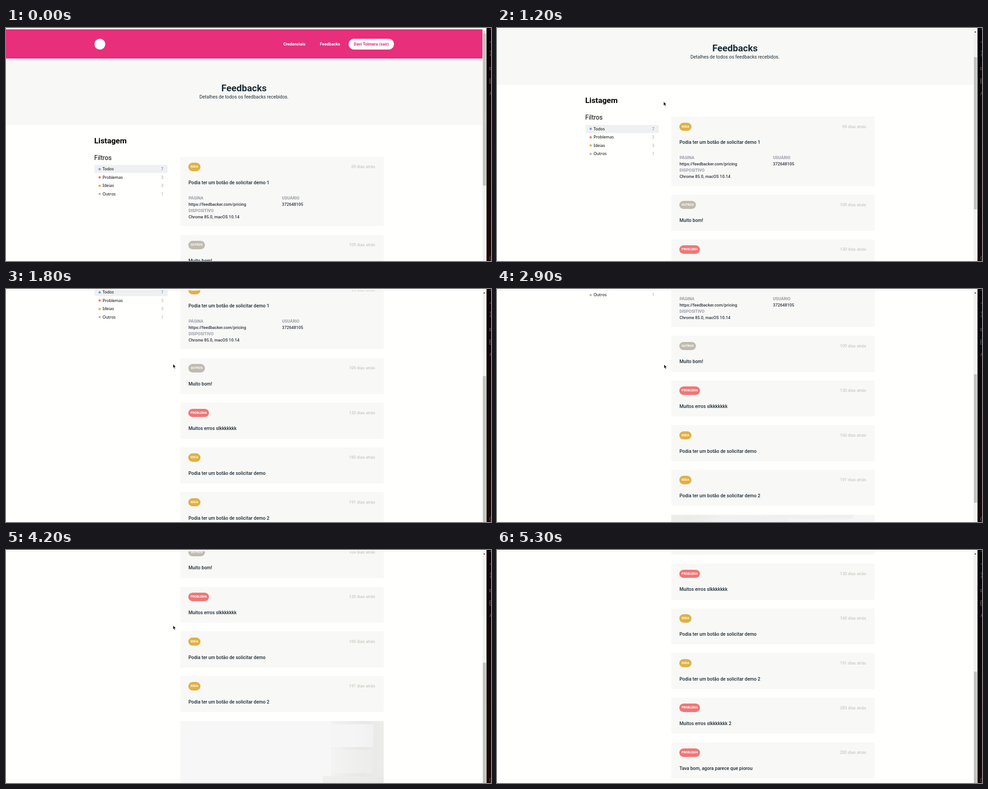
These frames come from a looping animation (1080 by 519 pixels, 6200 ms). An HTML page:

```html
<!DOCTYPE html>
<html lang="pt-BR">
<head>
<meta charset="utf-8">
<title>Feedbacks</title>
<style>
html, body { margin: 0; width: 100%; height: 100%; overflow: hidden; background: #fffffd; }
body { position: relative; font: 9.25px/14px Roboto, sans-serif; color: #1b2c37; }
div, svg { position: absolute; }
div { white-space: nowrap; }
#view { left: 0; top: 3px; width: 1061px; height: 516px; overflow: hidden; }
#page { left: 0; width: 1061px; height: 1130px; }
.header { background: #e72f7c; }
.hero { background: #f8f8f6; }
.logo { background: #fff; border-radius: 50%; }
.nav { font-weight: 700; color: #fff; }
.user { background: #fff; border-radius: 12px; color: #e72f7c; font-weight: 700; line-height: 23.5px; text-align: center; }
.h1 { font-size: 20.8px; font-weight: 700; width: 1060px; text-align: center; }
.sub { font-size: 10.4px; width: 1060px; text-align: center; }
.h2 { font-size: 17.3px; font-weight: 700; color: #000; }
.h3 { font-size: 13.9px; color: #000; }
.active { background: #eff0f1; border-radius: 2px; }
.dot { border-radius: 50%; }
.filter { font: 9px/14px "Noto Sans", sans-serif; color: #000; }
.count { width: 30px; text-align: right; font-weight: 500; }
.card { background: #f8f8f6; border-radius: 2px; }
.badge { height: 18.5px; border-radius: 10px; padding: 0 4.6px; color: #fff; font-size: 6.9px; font-weight: 700; line-height: 18.5px; }
.date { width: 100px; text-align: right; color: #c1bdb4; }
.title { font-size: 10.4px; font-weight: 500; }
.label { font-weight: 700; color: #9a9ba9; }
.value { font-weight: 500; color: #2c3340; }
.early { background:
  linear-gradient(90deg, #f2f3f2, #f5f6f5) 262px 8px / 191px 147px no-repeat,
  linear-gradient(90deg, #ecedeb 22px, #ebecea 40px, #f0f1f0 110px, #eeefee 404px, #f5f6f5 404px); }
.late { background:
  linear-gradient(90deg, #f4f5f4 55%, #f0f1f0) 336px 7px / 94px 51px no-repeat,
  linear-gradient(90deg, #f3f4f3, #ececea) 336px 64px / 94px 52px no-repeat,
  linear-gradient(90deg, #eff0ee, #e9e9e7) 317px 123px / 136px 32px no-repeat,
  linear-gradient(90deg, #f1f2f1, #e7e8e6 60%, #ecedeb) 336px 0 / 117px 155px no-repeat,
  #f6f7f6; }
#edge { left: 0; top: 3px; width: 1061px; height: 1px; background: rgba(0, 0, 0, .07); }
#track { left: 1061px; top: 3px; width: 9px; height: 516px; background: #f1f1ef; overflow: hidden; }
#thumb { left: 1px; width: 7px; background: #c1c3bf; }
#arrow { left: 2px; top: 4px; border: solid transparent; border-width: 0 2.5px 3px; border-bottom-color: #333; }
#dock { left: 1070px; top: 0; }
</style>
</head>
<body>
<div id="view"><div id="page"></div></div>
<div id="edge"></div>
<div id="track"><div id="arrow"></div><div id="thumb"></div></div>
<svg id="dock" width="10" height="519">
  <defs><linearGradient id="dark" x2="0" y2="1"><stop stop-color="#0b0406"/><stop offset="1" stop-color="#1b0706"/></linearGradient></defs>
  <rect width="10" height="519" fill="url(#dark)"/>
  <path d="M7 3h3M7 33l3-4M10 50q-4 2 0 5M10 57q-4 3 0 6M7 88h3M7 88v5h3M10 113H7v10h3M7 118h3M7 149l3-7M10 507q-6 5 0 11" fill="none" stroke="#77686a"/>
</svg>
<svg id="cursor" width="9" height="13" viewBox="-1 -1 9 13"><path d="M0 0V9L2 7.2 3.4 10.5 5 9.8 3.6 6.6H6.5Z" fill="#111" stroke="#fff" stroke-width=".7"/></svg>
<script>
const $ = id => document.getElementById(id);
const page = $('page');

function add(cls, x, y, text = '', parent = page) {
  const el = document.createElement('div');
  el.className = cls;
  el.style.left = x + 'px';
  el.style.top = y + 'px';
  el.textContent = text;
  parent.append(el);
  return el;
}
function box(cls, x, y, w, h, text, parent) {
  const el = add(cls, x, y, text, parent);
  el.style.width = w + 'px';
  el.style.height = h + 'px';
  return el;
}
// y is the middle of the line
const line = (cls, x, y, text, parent) => add(cls, x, y - 7, text, parent);

const colors = { TODOS: '#7b98e8', PROBLEMA: '#f17676', IDEIA: '#e0b143', OUTROS: '#bfbbae' };

box('header', 0, 0, 1061, 68.4);
box('hero', 0, 68.4, 1061, 148);
box('logo', 197, 24, 24, 24);
line('nav', 617.5, 35.5, 'Credenciais');
line('nav', 699, 35.5, 'Feedbacks');
box('user', 763, 24, 101, 23.5, 'Davi Tolmera (sair)');
line('h1', 0, 134, 'Feedbacks');
line('sub', 0, 154, 'Detalhes de todos os feedbacks recebidos.');
line('h2', 196.5, 250.5, 'Listagem');
line('h3', 196.5, 288.5, 'Filtros');

box('active', 197, 305, 163, 18.3);
[['Todos', 7, 'TODOS'], ['Problemas', 3, 'PROBLEMA'], ['Ideias', 3, 'IDEIA'], ['Outros', 1, 'OUTROS']]
  .forEach(([name, count, kind], i) => {
    const y = 314 + i * 18.5;
    box('dot', 206, y - 2.5, 5, 5).style.background = colors[kind];
    line('filter', 215, y, name);
    line('count', 320.5, y, count).style.color = i ? colors.OUTROS : colors.TODOS;
  });

const cards = [
  ['IDEIA', 69, 'Podia ter um botão de solicitar demo 1'],
  ['OUTROS', 109, 'Muito bom!'],
  ['PROBLEMA', 130, 'Muitos erros slkkkkkkk'],
  ['IDEIA', 160, 'Podia ter um botão de solicitar demo'],
  ['IDEIA', 191, 'Podia ter um botão de solicitar demo 2'],
  ['PROBLEMA', 283, 'Muitos erros slkkkkkkk 2'],
  ['PROBLEMA', 283, 'Tava bom, agora parece que piorou']
].map(([kind, days, title], i) => {
  const y = i ? 460.5 + (i - 1) * 99.6 : 286.5;
  const card = box('card', 388, y, 453, i ? 80.6 : 154.5);
  add('badge', 18.4, 13.6, kind, card).style.background = colors[kind];
  line('date', 334, 22.7, days + ' dias atrás', card);
  line('title', 18.2, 58.4, title, card);
  return card;
});
[['label', 18.4, 92, 'PÁGINA'], ['value', 18.4, 106, 'https://feedbacker.com/pricing'],
 ['label', 18.4, 120, 'DISPOSITIVO'], ['value', 18.4, 134, 'Chrome 85.0, macOS 10.14'],
 ['label', 226.4, 92, 'USUÁRIO'], ['value', 226.4, 106, '372648105']]
  .forEach(([cls, x, y, text]) => line(cls, x, y, text, cards[0]));
const skeleton = box('card', 388, 859, 453, 154.5);

// keys: [time, value...]
const scrollKeys = [[500, 0], [600, 4], [900, 59.5], [1200, 89.5], [1400, 90.5], [1500, 90.5],
  [1600, 130], [1700, 230], [1800, 307], [1900, 307], [2000, 326], [2200, 356.5],
  [2900, 356.5], [3200, 440], [3400, 478.5], [4200, 478.5], [4400, 512], [4600, 530]];
const cursorKeys = [[600, 345, 110], [900, 361, 140], [1200, 371, 164], [1800, 371.5, 167],
  [2900, 372, 167.5], [4900, 372, 167.5], [5000, 330, 148], [5200, 121, 18]];

function at(keys, t) {
  const i = keys.findIndex(k => k[0] > t);
  if (i < 0) return keys[keys.length - 1].slice(1);
  if (!i) return keys[0].slice(1);
  const a = keys[i - 1], b = keys[i], p = (t - a[0]) / (b[0] - a[0]);
  return a.slice(1).map((v, j) => v + (b[j + 1] - v) * p);
}

const STEP = 100, LOOP = 6200;
function draw() {
  const t = Math.floor(performance.now() % LOOP / STEP) * STEP;
  const [scroll] = at(scrollKeys, t);
  const loading = t >= 2900 && t < 5000, loaded = t >= 5000;
  const height = loaded ? 1127 : loading ? 1101 : 927.5;

  page.style.top = -3 - scroll + 'px';
  skeleton.style.display = loading ? '' : 'none';
  skeleton.className = 'card ' + (t < 3200 ? 'early' : 'late');
  cards.slice(5).forEach(c => c.style.display = loaded ? '' : 'none');

  $('thumb').style.top = 9 + scroll * 551 / height + 'px';
  $('thumb').style.height = 314400 / height + 'px';
  $('arrow').style.borderBottomColor = scroll ? '#333' : '#a9a9a9';

  const [x, y] = at(cursorKeys, t), cursor = $('cursor').style;
  cursor.display = t >= 600 && t < 5300 ? '' : 'none';
  cursor.left = x - 1 + 'px';
  cursor.top = y - 1 + 'px';
  requestAnimationFrame(draw);
}
draw();
</script>
</body>
</html>
```
